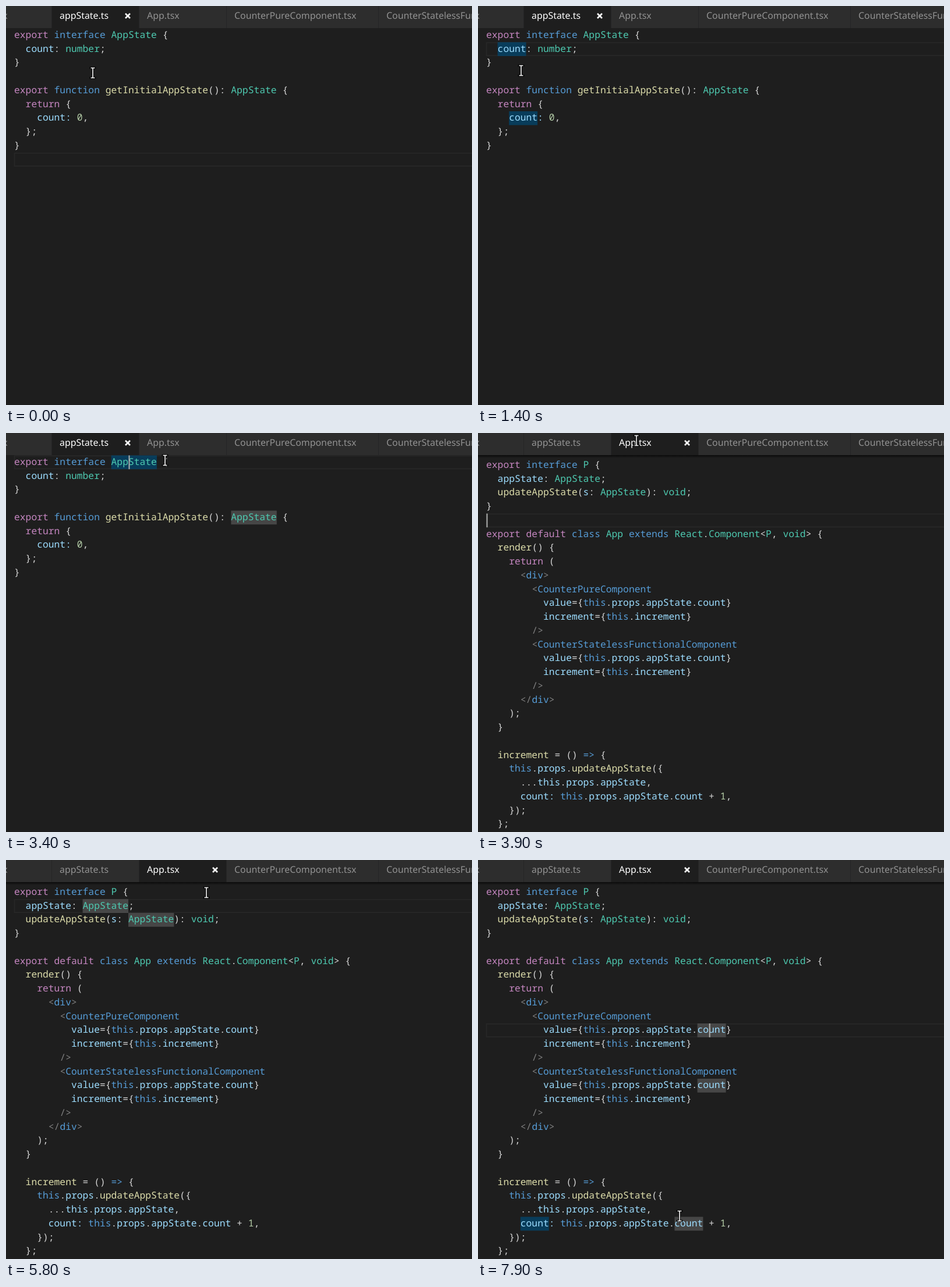
Recreate the animation shown at these times as an HTML page. Size 800 by 686 pixels, loop 8 s.

```html
<!DOCTYPE html>
<html lang="en">
<head>
<meta charset="utf-8">
<title>Code editor</title>
<style>
html, body { margin: 0; height: 100%; overflow: hidden; background: #1e1e1e; }
svg { display: block; width: 800px; height: 686px; }
text { white-space: pre; text-rendering: geometricPrecision; }
.code { font: 16.33px "Noto Sans Mono", "DejaVu Sans Mono", monospace; }
.tab { font: 15.9px "Noto Sans", "Open Sans", sans-serif; }
</style>
</head>
<body>
<svg id="stage" viewBox="0 0 800 686"></svg>
<script>
const LOOP = 8000, STEP = 100, BLINK = 500, MARK_DELAY = 200;
const LEFT = 14, CHAR = 9.8, ROW = 23.75, BASELINE = 16.45;

// "~" plus a letter switches the colour of the text after it
const COLORS = {
  w: '#d4d4d4', p: '#c586c0', b: '#569cd6', t: '#4ec9b0',
  v: '#9cdcfe', f: '#dcdcaa', n: '#b5cea8', g: '#808080'
};
const counter = name => `        ~g<~b${name}
          ~vvalue~w={~bthis~w.~vprops~w.~vappState~w.~vcount~w}
          ~vincrement~w={~bthis~w.~vincrement~w}
        ~g/>`;

const stateFile = { top: 38.5, title: 'appState.ts', code: `~pexport ~binterface ~tAppState~w {
  ~vcount~w: ~tnumber~w;
}

~pexport ~bfunction ~fgetInitialAppState~w(): ~tAppState~w {
  ~preturn~w {
    ~vcount: ~n0~w,
  };
}
` };

const appFile = { top: 43.5, title: 'App.tsx', scrolled: true, code: `~pexport ~binterface ~tP~w {
  ~vappState~w: ~tAppState~w;
  ~fupdateAppState~w(~vs~w: ~tAppState~w): ~tvoid~w;
}

~pexport default ~bclass ~tApp ~bextends ~tReact~w.~tComponent~w<~tP~w, ~tvoid~w> {
  ~frender~w() {
    ~preturn~w (
      ~g<~bdiv~g>
${counter('CounterPureComponent')}
${counter('CounterStatelessFunctionalComponent')}
      ~g</~bdiv~g>
    ~w);
  }

  ~fincrement~w = () ~b=>~w {
    ~bthis~w.~vprops~w.~fupdateAppState~w({
      ...~vthis~w.~vprops~w.~vappState~w,
      ~vcount: ~bthis~w.~vprops~w.~vappState~w.~vcount~w + ~n1~w,
    });
  };` };

const TITLES = ['boot.tsx', 'appState.ts', 'App.tsx',
  'CounterPureComponent.tsx', 'CounterStatelessFunctional'];

// Where the caret goes; the word there gets highlighted everywhere
const CARETS = [
  { at: -700, file: stateFile, row: 9, col: 0 },
  { at: 900, file: stateFile, row: 1, col: 5 },
  { at: 2200, file: stateFile, row: 0, col: 20 },
  { at: 3800, file: appFile, row: 4, col: 0 },
  { at: 5000, file: appFile, row: 1, col: 18 },
  { at: 6800, file: appFile, row: 10, col: 39 }
];

// Stops of the mouse: arrival, departure, x, y
const STOPS = [
  [0, 100, 149, 115], [900, 1100, 63, 76], [1400, 1400, 74, 111], [2150, 2400, 212, 47],
  [3400, 3400, 273, 47], [3700, 4000, 272, 13], [4900, 5500, 189, 79],
  [5800, 5800, 344, 56], [6500, 6900, 394, 287], [7050, 7200, 480, 314], [7900, LOOP, 346, 612]
];

const esc = s => s.replace(/</g, '&lt;').replace(/>/g, '&gt;');
const rect = (x, y, w, h, fill, more = '') =>
  `<rect x="${x}" y="${y}" width="${w}" height="${h}" fill="${fill}" ${more}/>`;
const label = (x, title, fill) => `<text class="tab" x="${x}" y="22" fill="${fill}">${title}</text>`;
const colX = col => LEFT + col * CHAR;
const rowY = (file, row) => file.top + row * ROW;

function codeLines(file) {
  let color = 'w';
  return file.code.split('\n').map((line, row) => {
    const spans = line.split(/(?=~)/).map(part => {
      if (part[0] === '~') {
        color = part[1];
        part = part.slice(2);
      }
      return `<tspan fill="${COLORS[color]}">${esc(part)}</tspan>`;
    }).join('');
    return `<text class="code" x="${LEFT}" y="${rowY(file, row) + BASELINE}">${spans}</text>`;
  }).join('');
}

function tabBar(active) {
  let end = -71;
  return rect(0, 0, 800, 38, '#252526') + TITLES.map(title => {
    const x = end, on = title === active;
    end += title.length > 20 ? 261 : 150;
    return rect(x, 0, end - x - 1, 38, on ? '#1e1e1e' : '#2d2d2d') +
      label(x + 13, title, on ? '#fff' : '#929292') +
      (on ? `<path d="M${end - 24} 13l8 8m0-8l-8 8" stroke="#fff" stroke-width="2.6"/>` : '');
  }).join('');
}

const SHADOW = '<linearGradient id="shade" x2="0" y2="1"><stop stop-opacity=".65"/>' +
  '<stop offset="1" stop-opacity="0"/></linearGradient>' + rect(0, 38, 800, 5, 'url(#shade)');

for (const file of [stateFile, appFile]) {
  file.lines = file.code.replace(/~./g, '').split('\n');
  file.picture = codeLines(file) + (file.scrolled ? SHADOW : '') + tabBar(file.title);
}

// Declarations are blue, uses are grey
function wordMarks({ file, row, col }) {
  const line = file.lines[row];
  const word = /\w*$/.exec(line.slice(0, col))[0] + /^\w*/.exec(line.slice(col))[0];
  if (!word) return '';
  return file.lines.map((text, r) => [...text.matchAll(`\\b${word}\\b`)].map(({ index }) => {
    const declared = text[index + word.length] === ':' || text.slice(0, index).endsWith('interface ');
    return rect(colX(index), rowY(file, r), word.length * CHAR, ROW,
      declared ? '#004972' : '#575757', 'fill-opacity=".72"');
  }).join('')).join('');
}

function mouse(t) {
  const i = STOPS.findLastIndex(stop => stop[0] <= t);
  const [, leave, x0, y0] = STOPS[i];
  const [arrive, , x1, y1] = STOPS[i + 1] || STOPS[i];
  const k = t > leave ? (t - leave) / (arrive - leave) : 0;
  const x = Math.round(x0 + (x1 - x0) * k), y = Math.round(y0 + (y1 - y0) * k);
  const d = `M${x - 3.5} ${y - 8.5}h7m-3.5 0v17m-3.5 0h7`;
  return `<path d="${d}" fill="none" stroke="#000" stroke-width="3.6" stroke-linecap="square"/>` +
    `<path d="${d}" fill="none" stroke="#fff" stroke-width="1.6"/>`;
}

function draw(t) {
  const caret = CARETS.findLast(c => c.at <= t);
  const y = rowY(caret.file, caret.row), age = t - caret.at;
  return rect(0, 0, 800, 686, '#1e1e1e') +
    rect(LEFT + .5, y + .8, 800, ROW - 1.6, 'none', 'stroke="#282828" stroke-width="1.6"') +
    (age < MARK_DELAY ? '' : wordMarks(caret)) +
    caret.file.picture +
    (age % (2 * BLINK) < BLINK ? rect(colX(caret.col) + .5, y, 2, ROW, '#aeafad') : '') +
    mouse(t);
}

const stage = document.getElementById('stage');
let shown = -1;
function tick() {
  const t = Math.floor(performance.now() % LOOP / STEP) * STEP;
  if (t !== shown) stage.innerHTML = draw(shown = t);
  requestAnimationFrame(tick);
}
tick();
</script>
</body>
</html>
```
